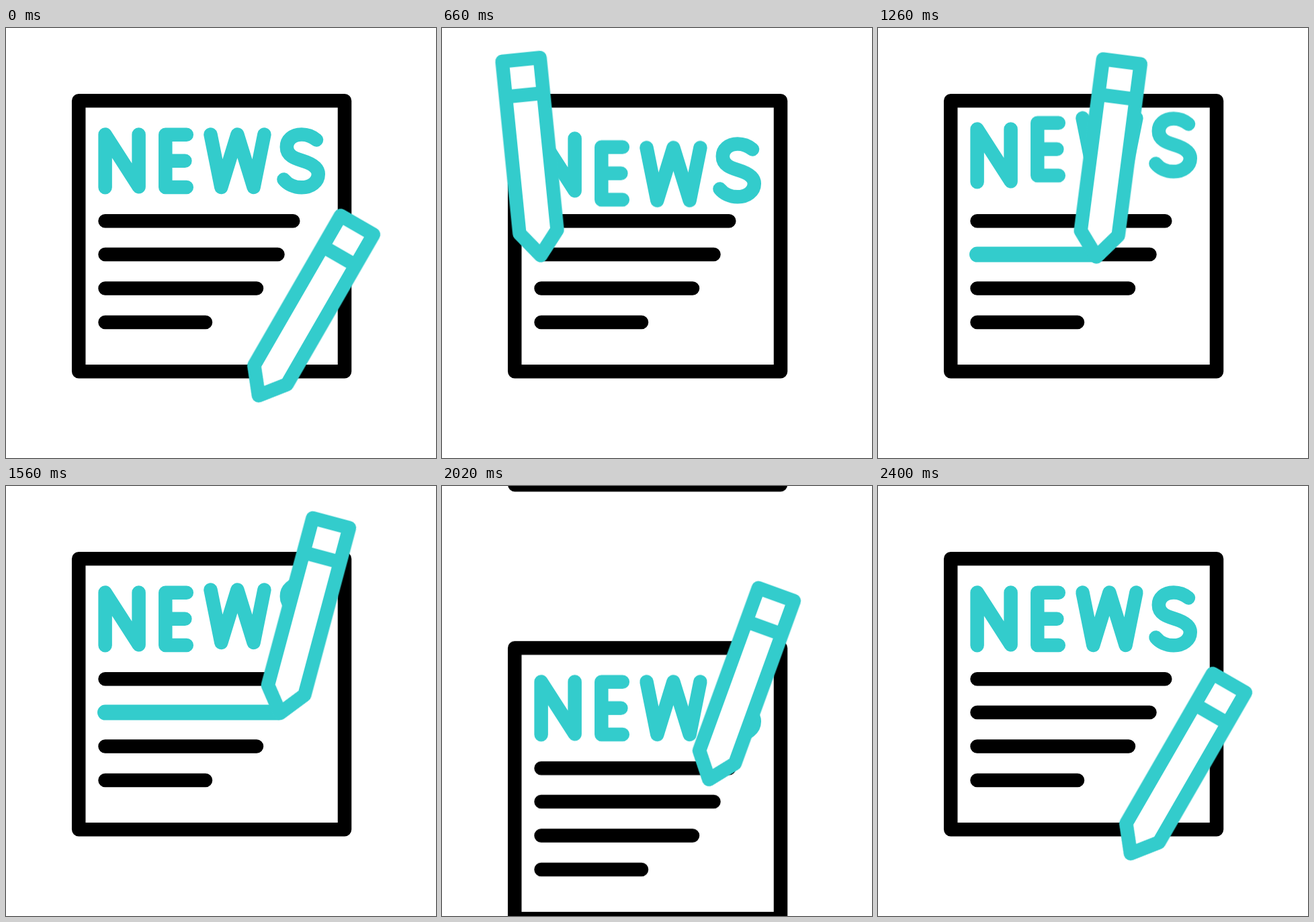
Write an HTML page that moves like this. It is 640x640 px and loops after 2.42 s.

```html
<!DOCTYPE html>
<html lang="en">
<head>
<meta charset="utf-8">
<title>News</title>
<style>
  :root {
    --start: 1ms;
    --loop: 2420ms;
    --smooth: cubic-bezier(.3333, 0, .6667, 1);
    --teal: #33cccc;
  }
  html, body {
    margin: 0;
    width: 100%;
    height: 100%;
    overflow: hidden;
    background: #fff;
  }
  svg {
    display: block;
    width: 100vw;
    height: 100vh;
    fill: none;
    stroke: #000;
    stroke-width: 20.5;
    stroke-linecap: round;
    stroke-linejoin: round;
  }
  .teal { stroke: var(--teal); }

  .scroll, .letter, .marker, .mover, .pencil {
    animation: var(--loop) var(--smooth) var(--start) infinite backwards;
  }
  .scroll { animation-name: scroll; }
  .letter {
    animation-name: wave;
    animation-delay: calc(var(--start) + var(--i) * 120ms);
  }
  .marker {
    stroke-width: 23;
    stroke-dasharray: 257 300;
    animation-name: mark;
  }
  .mover {
    offset-path: path("M449 420.6C420 220 170 193 124 193");
    offset-rotate: 0deg;
    animation-name: arc, slide;
  }
  .pencil {
    fill: #fff;
    animation-name: tilt;
  }

  @keyframes scroll {
    0%, 69.421% { transform: translateY(0); }
    89.256%, 100% { transform: translateY(-646px); }
  }
  @keyframes wave {
    0%, 59.504%, 100% { transform: translateY(0); }
    19.835% { transform: translateY(20.5px); }
    39.669% { transform: translateY(-25.6px); }
  }
  @keyframes mark {
    0%, 39.66% { stroke-dashoffset: 257; visibility: hidden; }
    39.67% { stroke-dashoffset: 257; visibility: visible; }
    59.504%, 100% { stroke-dashoffset: 0; visibility: visible; }
  }
  /* curve up to the text, then straight along the line and back down */
  @keyframes arc {
    0% { offset-distance: 0%; }
    29.752%, 100% { offset-distance: 100%; }
  }
  @keyframes slide {
    0%, 39.669% { translate: 0px 0px; }
    59.504%, 69.421% { translate: 321.7px 4px; }
    99.174%, 100% { translate: 325px 227.6px; }
  }
  @keyframes tilt {
    0% { transform: rotate(30deg); animation-timing-function: linear; }
    29.752%, 39.669% { transform: rotate(-9deg); }
    59.504% { transform: rotate(15deg); }
    69.421% {
      transform: rotate(15deg);
      animation-timing-function: cubic-bezier(.333, 0, .833, .833);
    }
    99.174%, 100% { transform: rotate(30deg); }
  }
</style>
</head>
<body>
<svg viewBox="0 0 640 640" role="img" aria-label="NEWS">
  <defs>
    <g id="sheet">
      <rect x="108.2" y="108.2" width="395.8" height="403"/>
      <path d="M147.5 287.3H427.3M147.5 337.1H404.5M147.5 387.5H373M147.5 438H297"/>
    </g>
    <path id="n" d="M147.6 237.2V158.5L197.6 236.3V158.5"/>
    <path id="e" d="M268.8 158.7H237.3V236.9H268.8M237.3 197.8H266.4"/>
    <path id="w" d="M304.5 158.5L320.3 237L344.4 158.5L368.6 237L384.4 158.5"/>
    <path id="s" d="M462 166.5C456 161.5 448 158.5 440 158.5C426 158.5 417.8 167 417.8 177C417.8 190 430 194 441 197.5C454 201.5 464.8 207 464.8 217.5C464.8 229 454 237.3 440 237.3C429 237.3 419 232.5 413.5 225.5"/>
  </defs>

  <g class="scroll">
    <use href="#sheet"/>
    <g class="teal">
      <g class="letter" style="--i:0"><use href="#n"/></g>
      <g class="letter" style="--i:1"><use href="#e"/></g>
      <g class="letter" style="--i:2"><use href="#w"/></g>
      <g class="letter" style="--i:3"><use href="#s"/></g>
      <path class="marker" d="M147.5 337.1H404.5"/>
    </g>
    <!-- the next page, with its letters at rest -->
    <g transform="translate(0 646)">
      <use href="#sheet"/>
      <g class="teal">
        <use href="#n"/><use href="#e"/><use href="#w"/><use href="#s"/>
      </g>
    </g>
  </g>

  <g class="mover">
    <path class="teal pencil" d="M-28.2 -147H28.2V110.5L0 146L-28.2 110.5ZM-28.2 -94H28.2"/>
  </g>
</svg>
</body>
</html>
```
